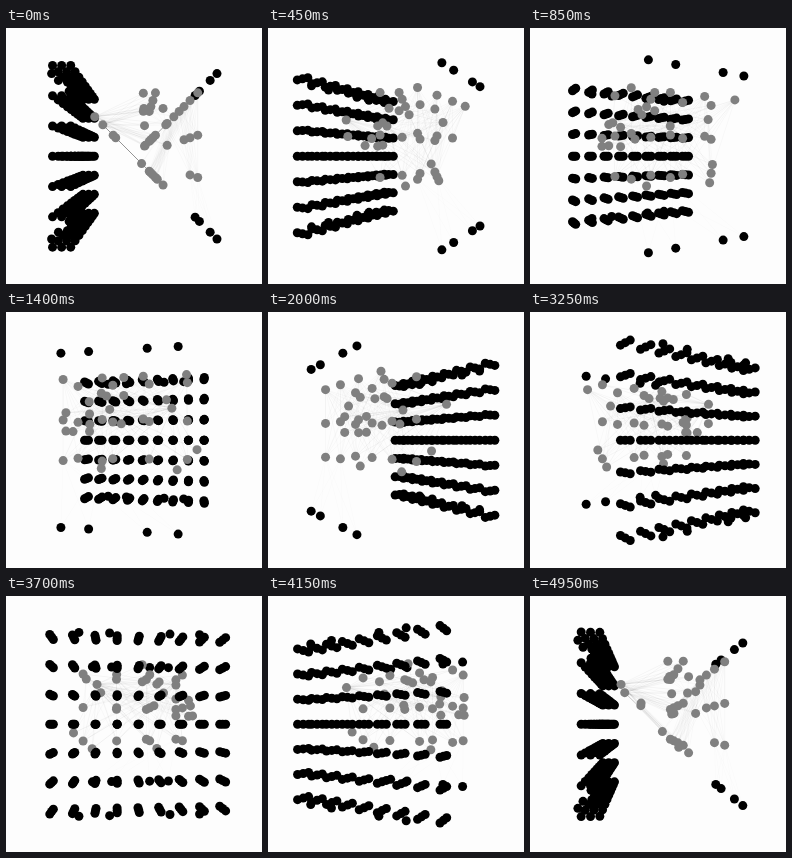
An HTML page with a canvas that plays this animation: 256 px wide and 256 px high, repeating every 5000 ms.

```html
<!DOCTYPE html>
<html lang="en">
<head>
<meta charset="utf-8">
<title>Rotating network</title>
<style>
  html, body { margin: 0; width: 100%; height: 100%; overflow: hidden; background: #fdfdfd; }
  canvas { display: block; width: 100vw; height: 100vh; }
</style>
</head>
<body>
<canvas id="stage" width="256" height="256"></canvas>
<script>
const ctx = document.getElementById('stage').getContext('2d');
const LOOP = 5000, STEP = 50;
const CENTER = 128.3, FOCAL = 307, DISTANCE = 4.38, RADIUS = 4.5;
const BLACK = '#000', GREY = '#808080';

const nodes = [];
const add = (x, y, z, color) => {
  const node = { x, y, z, color };
  nodes.push(node);
  return node;
};

// Input slab: three layers of 9 by 7 nodes.
for (const x of [-0.9, -0.8, -0.7])
  for (let col = -4; col <= 4; col++)
    for (let row = -3; row <= 3; row++) add(x, row / 3, col / 4, BLACK);

// Rows of four along the edges of the cube.
const edges = [];
for (const x of [-1, 1])
  for (const y of [-1, 1])
    for (const z of [-2, -1, 1, 2]) edges.push(add(x, y, z / 3, BLACK));

// Hidden nodes sit on octree cell centres, one scale per level.
const hiddenNode = (x, y, z) => add(x, y, z, GREY);
const coarse = [], middle = [], fine = [];
for (const x of [-0.5, 0.5])
  for (const z of [-0.5, 0.5]) coarse.push(hiddenNode(x, 0.5, z));

const quarterRows = [[1, 3, 4], [3, 3, 4], [1, 1, 4], [3, 1, 3], [-1, 1, 2], [1, -1, 4], [3, -1, 2]];
for (const [x, y, count] of quarterRows)
  for (let i = 0; i < count; i++) middle.push(hiddenNode(x / 4, y / 4, -0.75 + i / 2));

const eighths = [
  [1, 7, -1], [1, 5, -3], [1, 5, -1], [3, 5, -3], [1, 3, -5], [3, 3, -7],
  [1, 1, -5], [1, 1, -7], [3, 1, -7], [1, -1, 7], [3, -3, 5], [3, -3, -3]
];
for (const p of eighths) fine.push(hiddenNode(...p.map(v => v / 8)));

const links = [];
const link = (from, to, alpha) => {
  for (const a of from) for (const b of to) links.push([a, b, alpha]);
};
const upper = middle.filter(n => n.x === 0.75 && n.y === 0.75);
const lower = middle.filter(n => n.y === -0.25);
const outer = lower.filter(n => n.x === 0.75);
link(coarse.filter(n => n.x < 0), [...middle.filter(n => n.x === 0.25), ...fine], 0.035);
link(coarse.filter(n => n.x > 0), [...lower, ...fine], 0.02);
link(upper, [...lower, ...middle.filter(n => n.y === 0.25 && n.x > 0)], 0.025);
link(outer, edges.filter(n => n.x > 0 && n.y < 0), 0.012);

function project(node, cos, sin) {
  const depth = DISTANCE - sin * node.x + cos * node.z;
  const scale = FOCAL / depth;
  node.depth = depth;
  node.sx = CENTER + (cos * node.x + sin * node.z) * scale;
  node.sy = CENTER - node.y * scale;
}

function draw(time) {
  const angle = time / LOOP * 2 * Math.PI;
  const cos = Math.cos(angle), sin = Math.sin(angle);
  ctx.fillStyle = '#fdfdfd';
  ctx.fillRect(0, 0, 256, 256);
  for (const node of nodes) project(node, cos, sin);

  ctx.lineWidth = 1;
  for (const [a, b, alpha] of links) {
    ctx.strokeStyle = `rgba(0, 0, 0, ${alpha})`;
    ctx.beginPath();
    ctx.moveTo(a.sx, a.sy);
    ctx.lineTo(b.sx, b.sy);
    ctx.stroke();
  }

  for (const node of [...nodes].sort((a, b) => b.depth - a.depth)) {
    ctx.fillStyle = node.color;
    ctx.beginPath();
    ctx.arc(node.sx, node.sy, RADIUS, 0, 2 * Math.PI);
    ctx.fill();
  }
}

const start = performance.now();
function tick() {
  const elapsed = (performance.now() - start) % LOOP;
  draw(Math.floor(elapsed / STEP) * STEP);
  requestAnimationFrame(tick);
}
tick();
</script>
</body>
</html>
```
